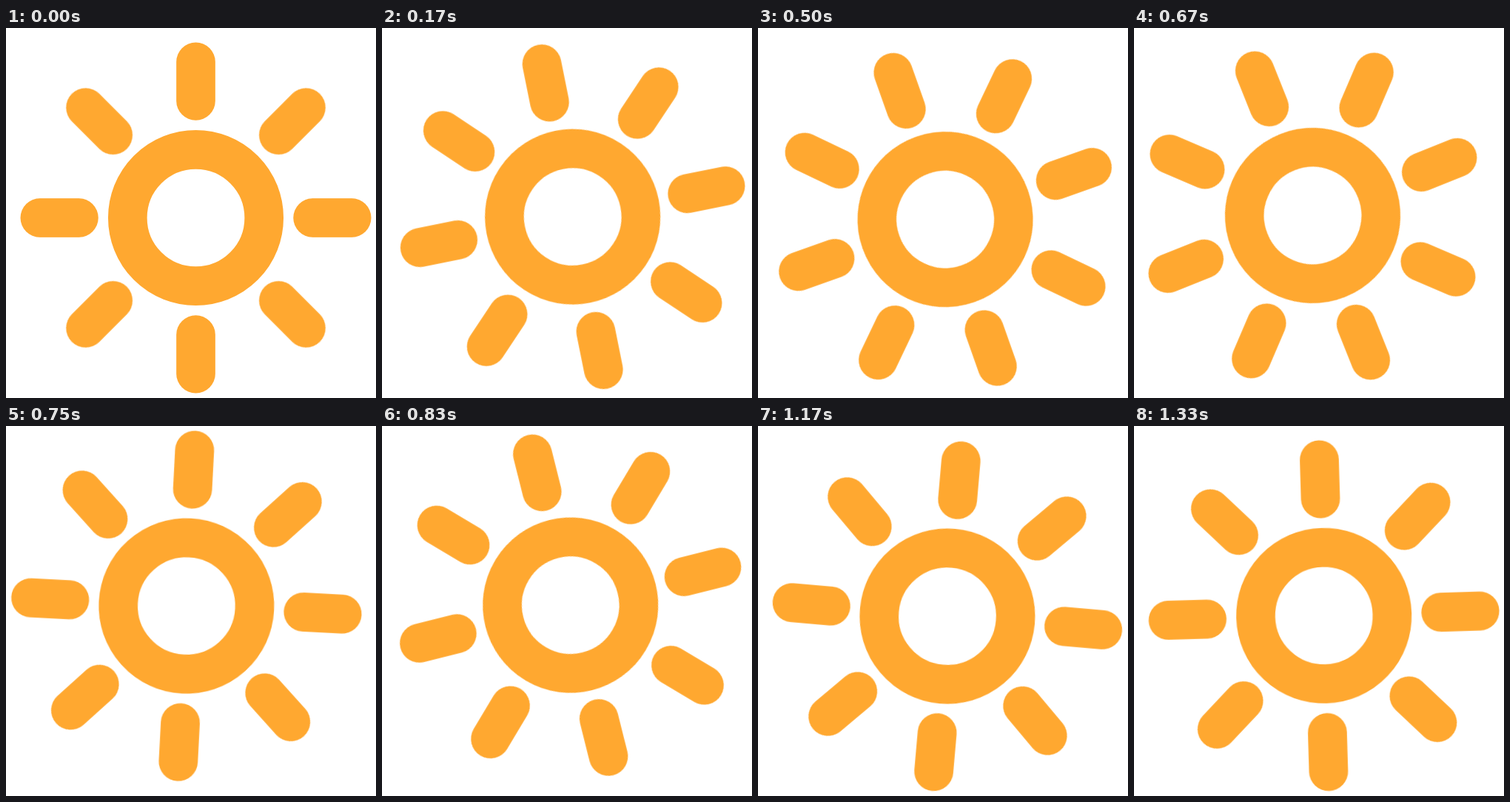
Write an HTML page that moves like this. It is 500 px wide and 500 px high and loops after 1.41 s.

```html
<!DOCTYPE html>
<html lang="en">
<head>
<meta charset="utf-8">
<title>Spinning sun</title>
<style>
  html, body { margin: 0; width: 100%; height: 100%; overflow: hidden; background: #fff; }
  svg { display: block; width: 100%; height: 100%; }
  #sun { transform-origin: 250px 250px; fill: none; stroke: #ffa830; stroke-width: 52.66; stroke-linecap: round; }
</style>
</head>
<body>
<svg viewBox="0 0 500 500">
  <g id="sun"><circle cx="256.5" cy="256.5" r="92.2"/></g>
</svg>
<script>
  const LOOP = 1410;
  const C = 256.5;
  const sun = document.getElementById('sun');

  for (let i = 0; i < 8; i++) {
    const ray = document.createElementNS('http://www.w3.org/2000/svg', 'path');
    ray.setAttribute('d', `M${C} ${C - 158}V${C - 210.7}`);
    ray.setAttribute('transform', `rotate(${i * 45} ${C} ${C})`);
    sun.append(ray);
  }

  // One turn with a wind-up and an overshoot, held at 12 steps per second.
  // The pivot is the stage centre, so the slightly offset sun wobbles.
  const angles = [0, -7, -11.4, -11.3, -6.7, 6.3, 25.5, 61, 113.2,
                  183, 255.9, 311.5, 345.5, 360, 365, 363, 358.3];
  const frames = angles.map((a, i) => ({
    offset: Math.round(i * 25 / 3) * 10 / LOOP,
    transform: `rotate(${a}deg)`,
    easing: 'steps(1, end)'
  }));
  frames.push({ offset: 1, transform: 'rotate(360deg)' });

  sun.animate(frames, { duration: LOOP, iterations: Infinity });
</script>
</body>
</html>
```
